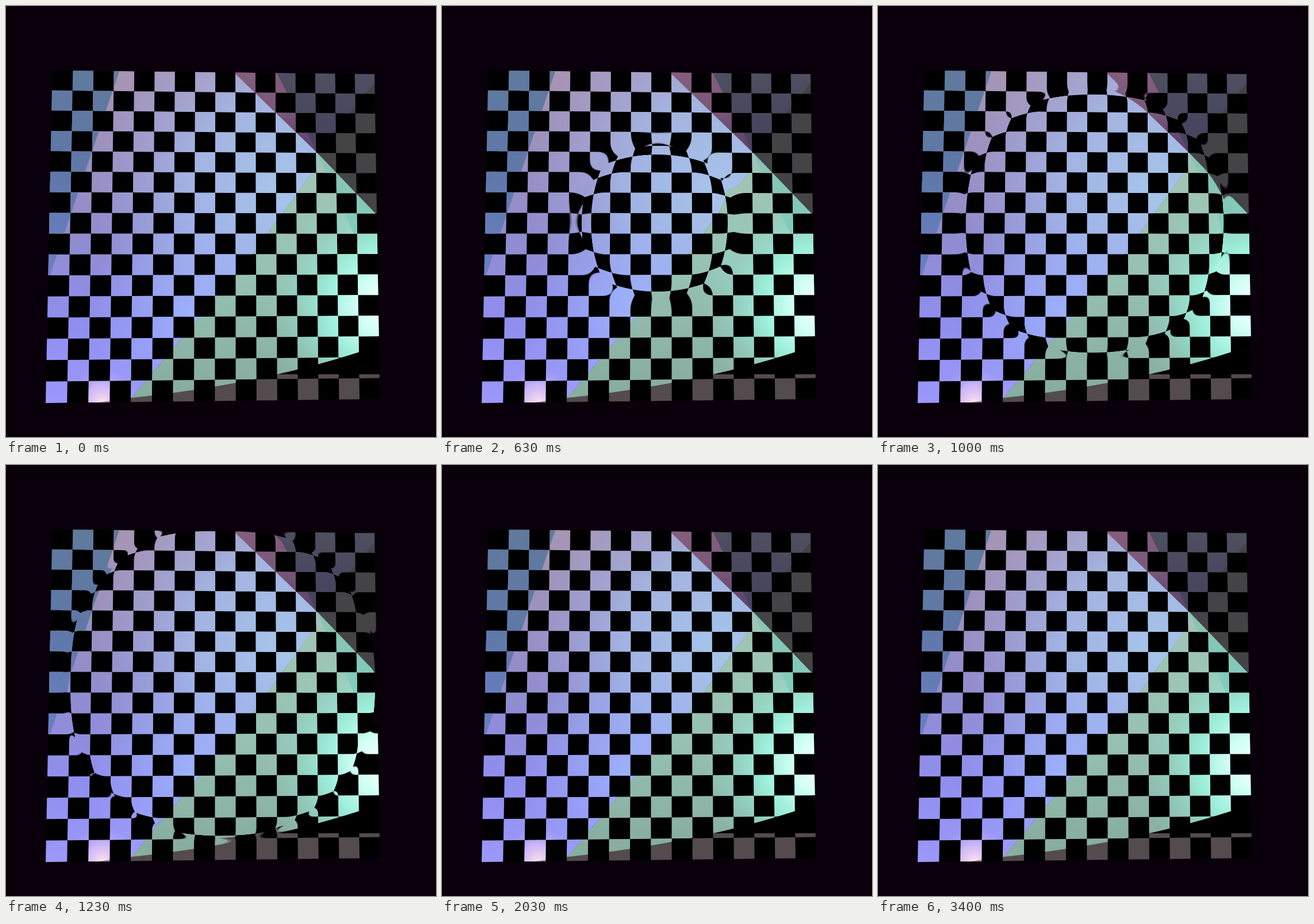
Recreate the animation shown at these times as an HTML page with a canvas. Size 748 by 749 pixels, loop 3.47 s.

```html
<!DOCTYPE html>
<html lang="en">
<head>
<meta charset="utf-8">
<title>Shock wave over a checkerboard</title>
<style>
  html, body { margin: 0; width: 100%; height: 100%; overflow: hidden; background: #0a000c; }
  canvas { display: block; }
</style>
</head>
<body>
<canvas id="stage" width="748" height="749"></canvas>
<script>
const W = 748, H = 749, LOOP = 3470, CELLS = 16;
const ctx = document.getElementById('stage').getContext('2d', { willReadFrequently: true });

// Perspective map from the unit square to the board's corners
function squareToQuad([x0, y0], [x1, y1], [x2, y2], [x3, y3]) {
  const sx = x0 - x1 + x2 - x3, sy = y0 - y1 + y2 - y3;
  const ax = x1 - x2, ay = y1 - y2, bx = x3 - x2, by = y3 - y2;
  const det = ax * by - bx * ay;
  const g = (sx * by - bx * sy) / det, h = (ax * sy - sx * ay) / det;
  return (u, v) => {
    const w = g * u + h * v + 1;
    return [
      ((x1 - x0 + g * x1) * u + (x3 - x0 + h * x3) * v + x0) / w,
      ((y1 - y0 + g * y1) * u + (y3 - y0 + h * y3) * v + y0) / w
    ];
  };
}
const board = squareToQuad([80.5, 111.7], [641, 118.6], [650.5, 683], [69, 690]);

function patch(u, v, size) {
  const corners = [board(u, v), board(u + size, v), board(u + size, v + size), board(u, v + size)];
  return new Path2D('M' + corners.join('L') + 'Z');
}

function shape(d, ...fills) {
  const path = new Path2D(d);
  for (const fill of fills) {
    ctx.fillStyle = fill;
    ctx.fill(path);
  }
}

// Colours are spread evenly along each gradient
function spread(gradient, colors) {
  colors.forEach((color, i) => gradient.addColorStop(i / (colors.length - 1), color));
  return gradient;
}
const down = (y0, y1, ...colors) => spread(ctx.createLinearGradient(0, y0, 0, y1), colors);
const glow = (x, y, r, ...colors) => spread(ctx.createRadialGradient(x, y, 0, x, y, r), colors);

function drawBoard() {
  ctx.fillStyle = '#0a000c';
  ctx.fillRect(0, 0, W, H);
  shape(patch(0, 0, 1), '#000');

  const cells = new Path2D();
  for (let j = 0; j < CELLS; j++) {
    for (let i = 1 - j % 2; i < CELLS; i += 2) cells.addPath(patch(i / CELLS, j / CELLS, 1 / CELLS));
  }
  ctx.save();
  ctx.clip(cells);

  // Back planes
  shape('M380 90H700V440H541Z', '#444345');
  shape('M460 98H665L640 135 541 255Z', down(117, 250, '#4e4f60', '#46415f'));
  shape('M370 90H458L541 255Z', down(117, 250, '#855d7c', '#795779', '#5a416a'));
  shape('M200 640H700V720H200Z', '#544b4e');

  // Violet wall
  shape('M160 90H371L398 117 541 255V278L430 430 218 681 190 715H40V400Z',
    down(115, 690, '#a795b4', '#9c90be', '#918ccf', '#8f8eee', '#9c98fb'),
    glow(480, 320, 330, '#a6c5ea', 'rgba(164,190,236,.75)', 'rgba(160,170,230,0)'),
    glow(330, 540, 190, 'rgba(158,182,255,.85)', 'rgba(158,176,255,0)'),
    glow(168, 690, 62, '#ffe4ee', 'rgba(225,195,245,.7)', 'rgba(180,165,255,0)'));
  shape('M140 692L182 686V694Z', '#8d7488');

  // Blue strip
  shape('M40 90H205L77 467 60 517H40Z', down(112, 467, '#607a9d', '#5f78a8', '#697fc3'));

  // Green wall
  shape('M541 255L643 361 700 420V575L612 602Q440 657.5 218 681L430 430 541 278Z',
    down(290, 660, '#a0c5b4', '#96c1b3', '#88ad a1'.replace(' ', '')),
    glow(664, 520, 210, '#fff', '#d2fff5', '#9ceedb', 'rgba(150,225,206,.45)', 'rgba(150,215,195,0)'));
  shape('M541 255L643 361 680 395H605Z', down(255, 390, '#8ac1b4', '#80cdbb'));
  ctx.restore();
}

drawBoard();
const still = ctx.getImageData(0, 0, W, H);
const frame = ctx.createImageData(W, H);
const src = still.data, out = frame.data;

// Expanding ring that samples the board further out than it lies;
// it weakens and narrows as it nears its final radius
const CX = 375, CY = 375.5, START = 449, REACH = 384;

function drawWave(t) {
  out.set(src);
  const radius = 10.43 * Math.max(0, t - START) ** 0.49;
  if (radius > 0 && radius < REACH) {
    const push = 0.1 * (REACH - radius);
    const band = 1.1 * push;
    const outer = radius + band;
    const top = Math.max(0, Math.floor(CY - outer));
    const bottom = Math.min(H - 1, Math.ceil(CY + outer));
    const left = Math.max(0, Math.floor(CX - outer));
    const right = Math.min(W - 1, Math.ceil(CX + outer));
    for (let y = top; y <= bottom; y++) {
      for (let x = left; x <= right; x++) {
        const dx = x + 0.5 - CX, dy = y + 0.5 - CY;
        const r = Math.hypot(dx, dy);
        const off = Math.abs(r - radius) / band;
        if (off >= 1 || r === 0) continue;
        const k = push * (1 - off) ** 2 / r;
        sample(x + dx * k, y + dy * k, (y * W + x) * 4);
      }
    }
  }
  ctx.putImageData(frame, 0, 0);
}

// Bilinear lookup
function sample(x, y, to) {
  x = Math.min(W - 1.01, Math.max(0, x));
  y = Math.min(H - 1.01, Math.max(0, y));
  const ix = Math.floor(x), iy = Math.floor(y);
  const fx = x - ix, fy = y - iy;
  const a = (iy * W + ix) * 4, b = a + W * 4;
  for (let c = 0; c < 3; c++) {
    const upper = src[a + c] + (src[a + 4 + c] - src[a + c]) * fx;
    const lower = src[b + c] + (src[b + 4 + c] - src[b + c]) * fx;
    out[to + c] = upper + (lower - upper) * fy;
  }
}

const begin = performance.now();
function tick() {
  drawWave((performance.now() - begin) % LOOP);
  requestAnimationFrame(tick);
}
tick();
</script>
</body>
</html>
```
